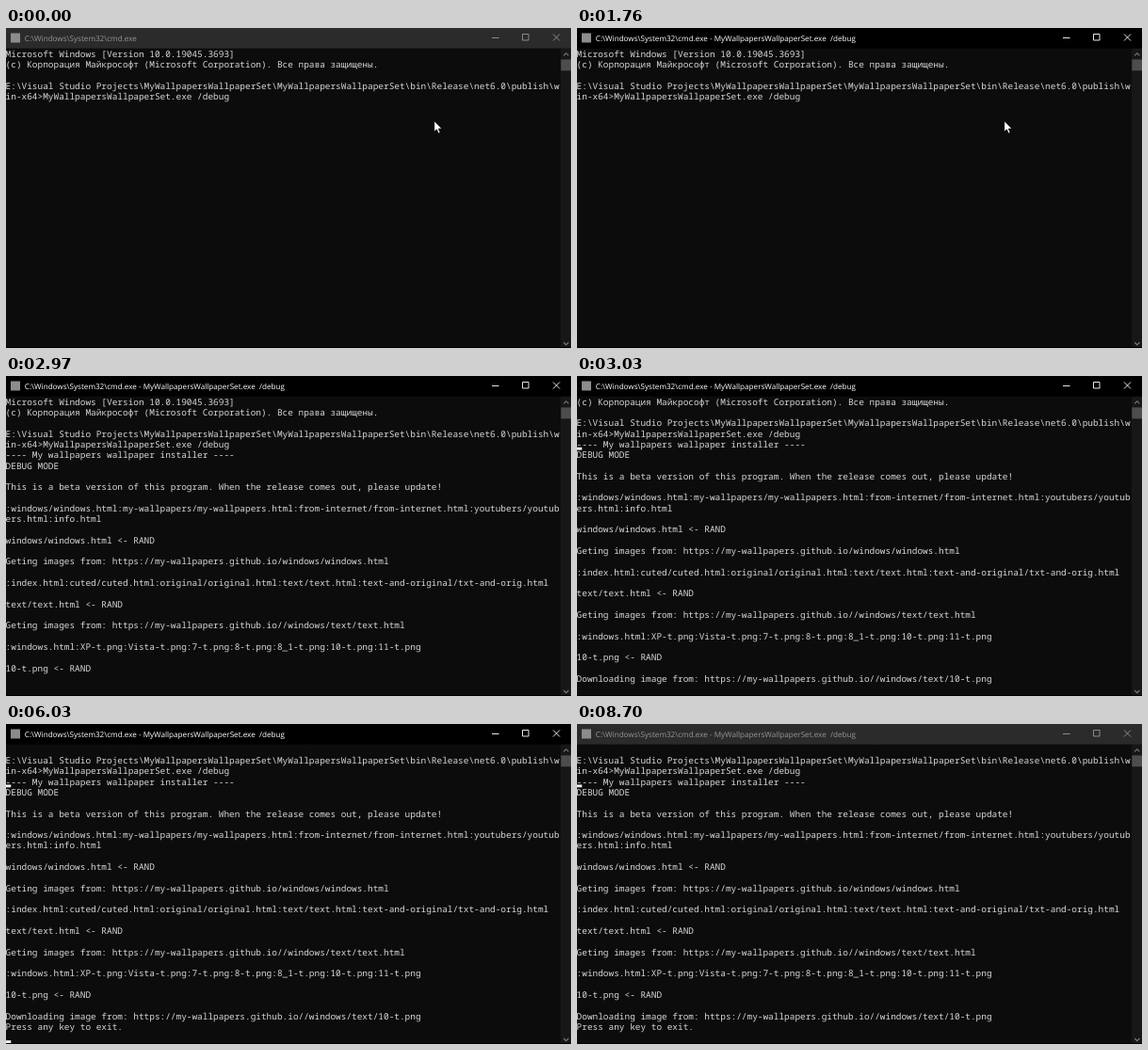
Recreate the animation shown at these times as an HTML page. Size 600 by 340 pixels, loop 8.76 s.

```html
<!DOCTYPE html>
<html lang="ru">
<head>
<meta charset="utf-8">
<title>Console</title>
<style>
  html, body { margin: 0; width: 100%; height: 100%; overflow: hidden; background: #0c0c0c; }
  svg { display: block; width: 600px; height: 340px; }
  text { white-space: pre; text-rendering: geometricPrecision; }
  #rows { fill: #d6d6d6; font-family: "Noto Sans Mono", "DejaVu Sans Mono", monospace; }
  #title { font: 8.14px "Open Sans", "Noto Sans", sans-serif; }
</style>
</head>
<body>
<svg viewBox="0 0 600 340">
  <rect width="600" height="340" fill="#0c0c0c"/>
  <g id="rows"></g>
  <rect id="caret" fill="#f2f2f2"/>
  <rect y="339" width="600" height="1" fill="#000"/>

  <rect x="589" y="21.6" width="11" height="317.4" fill="#171717"/>
  <rect x="589.3" y="33.4" width="10.7" height="11.9" fill="#4d4d4d"/>
  <path d="M592.2 29.3l2.6-2.6 2.6 2.6M592.2 334l2.6 2.6 2.6-2.6" fill="none" stroke="#7c7c7c" stroke-width="1.1"/>

  <rect id="bar" width="600" height="21.6"/>
  <rect x="5" y="5.5" width="10" height="10" fill="#8c8c8c"/>
  <text id="title" x="19.8" y="14"></text>
  <path id="buttons" d="M516 10.5h7.5M548.5 6.5h6.5v6.5h-6.5zM581 6.5l7 7M588 6.5l-7 7" fill="none" stroke-width="0.9"/>

  <path id="mouse" d="M0 0v11.4l2.6-2.4 1.8 4.2 1.9-.8-1.8-4.1h3.6z" fill="#fff" stroke="#000" stroke-width="0.7"/>
</svg>
<script>
const LOOP = 8760, SCALE = 600 / 848;
const COL = 8 * SCALE, ROW = 16 * SCALE, MARK = 4 * SCALE;
const LEFT = -0.4, TOP = 22;
const $ = id => document.getElementById(id);
const SHELL = 'C:\\Windows\\System32\\cmd.exe';
const PROGRAM = 'MyWallpapersWallpaperSet.exe';
const SITE = 'https://my-wallpapers.github.io/';

// [time, row, text]
const lines = [
  [0, 0, 'Microsoft Windows [Version 10.0.19045.3693]'],
  [0, 1, '(c) Корпорация Майкрософт (Microsoft Corporation). Все права защищены.'],
  [0, 3, 'E:\\Visual Studio Projects\\MyWallpapersWallpaperSet\\MyWallpapersWallpaperSet\\bin\\Release\\net6.0\\publish\\w'],
  [0, 4, `in-x64>${PROGRAM} /debug`],
  [2060, 5, '---- My wallpapers wallpaper installer ----'],
  [2060, 6, 'DEBUG MODE'],
  [2120, 8, 'This is a beta version of this program. When the release comes out, please update!'],
  [2640, 10, ':windows/windows.html:my-wallpapers/my-wallpapers.html:from-internet/from-internet.html:youtubers/youtub'],
  [2640, 11, 'ers.html:info.html'],
  [2640, 13, 'windows/windows.html <- RAND'],
  [2640, 15, `Geting images from: ${SITE}windows/windows.html`],
  [2670, 17, ':index.html:cuted/cuted.html:original/original.html:text/text.html:text-and-original/txt-and-orig.html'],
  [2700, 19, 'text/text.html <- RAND'],
  [2730, 21, `Geting images from: ${SITE}/windows/text/text.html`],
  [2910, 23, ':windows.html:XP-t.png:Vista-t.png:7-t.png:8-t.png:8_1-t.png:10-t.png:11-t.png'],
  [2940, 25, '10-t.png <- RAND'],
  [3000, 27, `Downloading image from: ${SITE}/windows/text/10-t.png`],
  [3240, 28, 'Press any key to exit.']
];

// [time, column, row]; no position means the caret is off
const carets = [
  [0], [210, 42, 4], [730], [1240, 42, 4], [1420, 0, 5], [1760],
  [3910, 0, 27], [4420], [4940, 0, 27], [5480], [6030, 0, 27],
  [6550], [7090, 0, 27], [7640], [8150, 0, 27], [8700]
];

// [time, x, y]
const pointer = [
  [0, 454.8, 98.8], [90, 453.8, 98.8], [1910, 459, 97],
  [1940, 471, 92], [1970, 491, 84], [2000, 516.5, 74.5], [2030]
];

const svg = (tag, attrs, parent) => {
  const el = document.createElementNS('http://www.w3.org/2000/svg', tag);
  set(el, attrs);
  return parent.appendChild(el);
};
const set = (el, attrs) => {
  for (const k in attrs) el.setAttribute(k, attrs[k]);
};
const at = (steps, t) => steps.filter(s => s[0] <= t).pop();
const show = (el, on) => set(el, { visibility: on ? 'visible' : 'hidden' });
const grey = (from, to, p) => {
  const v = Math.round(from + (to - from) * p);
  return `rgb(${v},${v},${v})`;
};
const caretBox = (col, row) => ({
  x: LEFT + col * COL, y: TOP + (row + 1) * ROW - MARK, width: COL, height: MARK
});

const rows = $('rows');
set(rows, { 'font-size': COL / 0.6 });
const items = lines.map(([time, row, text]) => {
  const el = svg('text', { x: LEFT, y: TOP + row * ROW + 8.6 }, rows);
  el.textContent = text;
  return { time, el };
});

// caret mark left behind, scrolls with the text
items.push({ time: 3000, el: svg('rect', { ...caretBox(0, 5), fill: '#f2f2f2' }, rows) });

function draw(t) {
  const focus = t < 30 || t >= 8700 ? 0 : Math.min(5, Math.floor((t - 30) / 52.5) + 1) / 5;
  set($('bar'), { fill: grey(43, 0, focus) });
  set($('title'), { fill: grey(150, 255, focus) });
  set($('buttons'), { stroke: grey(150, 255, focus) });
  $('title').textContent = t < 1420 ? SHELL : `${SHELL} - ${PROGRAM}  /debug`;

  const scroll = (t >= 3000) + (t >= 3240);
  set(rows, { transform: `translate(0 ${-scroll * ROW})` });
  for (const { time, el } of items) show(el, t >= time);

  const [, col, row] = at(carets, t);
  show($('caret'), row !== undefined);
  if (row !== undefined) set($('caret'), caretBox(col, row));

  const [, x, y] = at(pointer, t);
  show($('mouse'), x !== undefined);
  if (x !== undefined) set($('mouse'), { transform: `translate(${x} ${y})` });
}

const start = performance.now();
function tick() {
  draw((performance.now() - start) % LOOP);
  requestAnimationFrame(tick);
}
tick();
</script>
</body>
</html>
```
